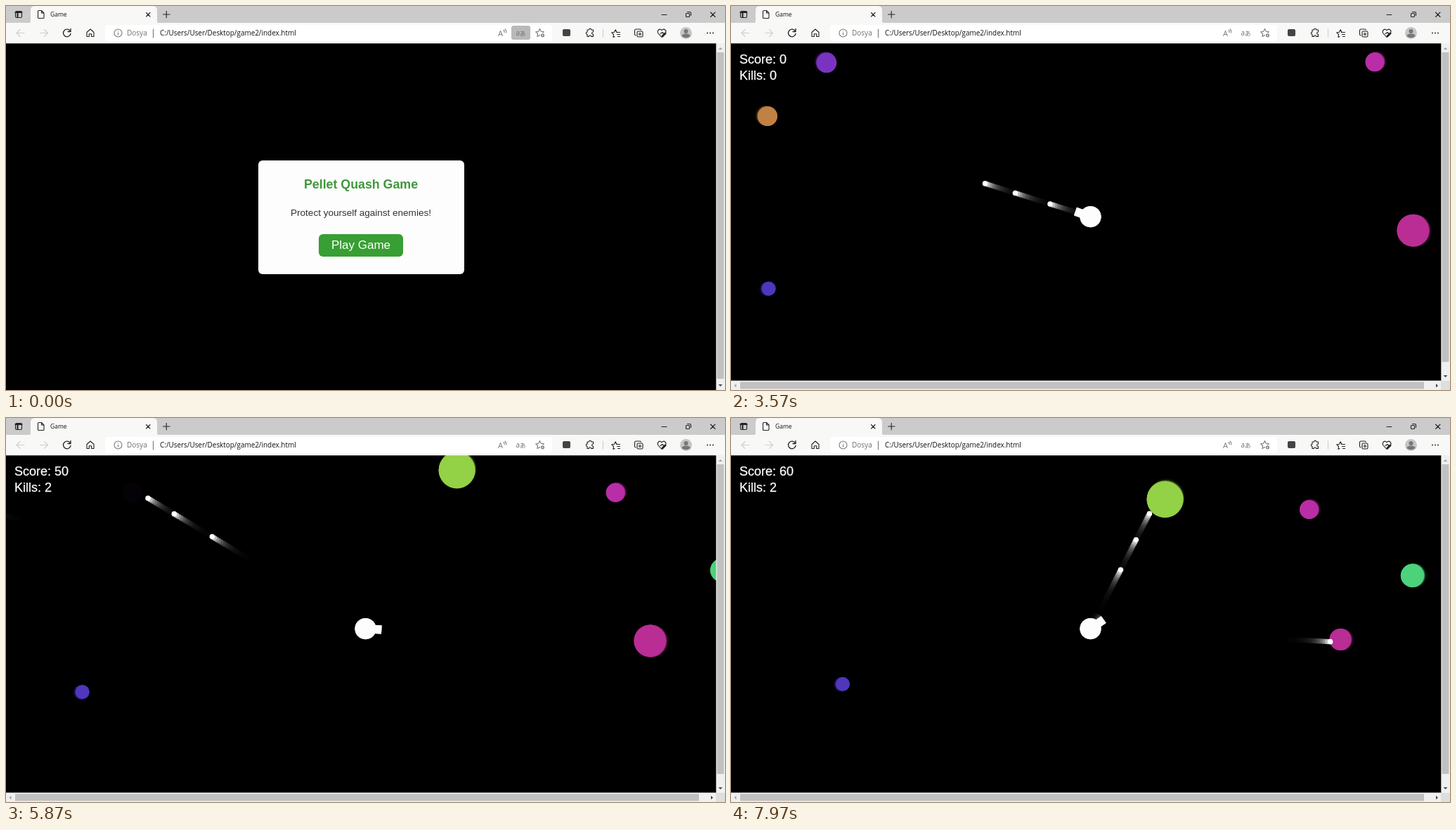
An HTML page with a canvas that plays this animation: 1023x547 px, repeating every 8000 ms.

```html
<!DOCTYPE html>
<html lang="en">
<head>
<meta charset="utf-8">
<title>Game</title>
<style>
  html, body { margin: 0; width: 100%; height: 100%; overflow: hidden; background: #000; }
  canvas, svg { position: absolute; left: 0; top: 0; display: block; }
  canvas { top: 53px; }
  #hud, #card { position: absolute; font-family: "Liberation Sans", Arial, sans-serif; white-space: nowrap; }
  #hud { left: 12px; top: 65px; color: #fff; font-size: 18px; line-height: 22.7px; -webkit-text-stroke: .25px #fff; }
  #card {
    left: 359px; top: 220px; width: 293px; height: 162px;
    background: #fdfdfd; border-radius: 6px; text-align: center;
  }
  #card * { position: absolute; margin: 0; left: 0; width: 292px; }
  #card h1 { top: 24px; font-size: 17.8px; line-height: 21px; color: #3f983c; }
  #card p { top: 67px; font-size: 13.53px; line-height: 16px; color: #333; }
  #card button {
    left: 86px; top: 105px; width: 120px; height: 32px; padding: 0; border: 0;
    border-radius: 6px; background: #379f33; color: #fff; font: 17px/32px "Liberation Sans", Arial, sans-serif;
  }
  svg text { font-family: "Open Sans", "Noto Sans", sans-serif; }
  .ic { fill: none; stroke: #222; stroke-width: 1.1; stroke-linecap: round; stroke-linejoin: round; }
  .dim { stroke: #cfcfcf; }
  .soft { stroke: #777; }
</style>
</head>
<body>
<canvas id="game" width="1011" height="494"></canvas>
<div id="hud"><div>Score: <span id="score">0</span></div><div>Kills: <span id="kills">0</span></div></div>
<div id="card">
  <h1>Pellet Quash Game</h1>
  <p>Protect yourself against enemies!</p>
  <button>Play Game</button>
</div>

<svg width="1023" height="547" viewBox="0 0 1023 547">
  <!-- tab strip -->
  <rect width="1023" height="25" fill="#cbcbcb"/>
  <path d="M31 25q4 0 4-4V6q0-6 6-6h168q6 0 6 6v15q0 4 4 4z" fill="#f8f8f7"/>
  <rect y="24" width="1023" height="29.300" fill="#f8f8f7"/>
  <rect x="141" y="27" width="636" height="23" rx="4" fill="#fff"/>
  <g class="ic">
    <rect x="13.500" y="7.500" width="9" height="9" rx="1.500"/>
    <path d="M13.500 9h9M16.500 9v7" stroke-width="2"/>
    <path d="M45.500 7.500q0-1 1-1h4l3.500 3.500v6.500q0 1-1 1h-6.500q-1 0-1-1zM50.500 6.500v3.500h3.500"/>
    <path d="M199.500 9.500l5.500 5.500m0-5.500l-5.500 5.500M223.500 12h9.500M228.200 7.200v9.500"/>
    <path d="M933 12.500h7M1002.500 9l6.500 6.500m0-6.500l-6.500 6.500"/>
    <rect x="967.500" y="10.500" width="5" height="5" rx="1"/>
    <path d="M969.500 8.500h3.500q1.500 0 1.500 1.500v3.500"/>
  </g>
  <text x="63" y="15.300" font-size="8.500" fill="#111">Game</text>

  <!-- toolbar -->
  <g class="ic dim">
    <path d="M26 38.500h-11m5-5l-5 5 5 5M48.500 38.500h11m-5-5l5 5-5 5"/>
  </g>
  <g class="ic">
    <path d="M91.500 36a5.300 5.300 0 1 0 .5 3.500M92 32.500v4h-4" stroke-width="1.300"/>
    <path d="M115 37.500l5-4.500 5 4.500v6h-3.300v-3.700h-3.400v3.700H115z"/>
  </g>
  <g class="ic soft">
    <circle cx="159.500" cy="38.500" r="5.500"/>
    <path d="M159.500 38v3M159.500 35.700v.1M209.500 33v12"/>
    <path d="M708 34.500q1.500 1.200 1.200 3.200M710 33q2.300 2 1.800 5"/>
  </g>
  <text x="172" y="42" font-size="10" fill="#707070">Dosya</text>
  <text x="219" y="42" font-size="9.920" fill="#111">C:/Users/User/Desktop/game2/index.html</text>
  <text x="700" y="42.500" font-size="11" fill="#777">A</text>
  <rect id="hover" x="719" y="28" width="27" height="20" rx="3" fill="#b9b9b9"/>
  <text x="725.500" y="41.700" font-size="10" fill="#707070">a<tspan style="font-family:'Noto Sans CJK JP','Noto Sans CJK',sans-serif" font-size="8.500">あ</tspan></text>
  <g class="ic" stroke-width="1">
    <path d="M759.500 32.500l1.800 3.700 4 .6-2.900 2.800.5 3.900-3.400-1.900-3.600 1.900.7-4-2.900-2.700 4-.6z" class="soft"/>
    <circle cx="763.500" cy="42" r="3" fill="#555" stroke="#fff"/>
    <path d="M762 42h3M763.500 40.500v3" stroke="#fff" stroke-width=".8"/>
    <rect x="792" y="33" width="11" height="10" rx="2" fill="#444" stroke="none"/>
    <path d="M827 34h2.500q.2-2 1.600-2t1.600 2h2.800v3q-2 .1-2 1.700t2 1.700v3h-3q-.2-1.600-1.500-1.600t-1.500 1.600H827v-3q-1.700-.1-1.700-1.600t1.700-1.700z"/>
    <path d="M849.500 33v11" stroke="#ccc"/>
    <path d="M866 43.500l-2 1 .5-4-2.700-2.700 3.700-.5 1.700-3.600 1.700 3.600M868.500 37.500h5M869.500 40.500h4M870.500 43.500h3"/>
    <rect x="898" y="36" width="8" height="8" rx="1.500"/>
    <path d="M896 42q-1.500-.3-1.500-2v-5q0-2 2-2h5q2 0 2 1M900 40h4M902 38v4"/>
    <path d="M933 44.500l-5-5.500q-1.800-3 .5-5t4.500.700q2.500-2.700 4.800-.7t.3 5zM931 39.500l3-2 2 2"/>
    <path d="M934 43l4-4" stroke-width="3"/>
  </g>
  <circle cx="967.500" cy="38.500" r="8.500" fill="#c6c6c6"/>
  <circle cx="967.500" cy="36" r="3" fill="#777"/>
  <path d="M961.500 43q0-3.500 6-3.500t6 3.500q-6 4.500-12 0z" fill="#777"/>
  <path d="M998 38.500h.01M1002 38.500h.01M1006 38.500h.01" stroke="#222" stroke-width="1.900" stroke-linecap="round"/>

  <!-- scrollbars -->
  <rect x="1010.300" y="53" width="12.700" height="494" fill="#f0f0f0"/>
  <rect id="thumb" x="1011.500" y="66" width="10" height="465" fill="#c1c1c1"/>
  <path d="M1013.700 62h5.600l-2.800-3z" fill="#a3a3a3"/>
  <path id="down" d="M1013.700-1.500h5.600l-2.800 3z" fill="#444"/>
  <g id="hbar">
    <rect y="533.600" width="1010.300" height="13.400" fill="#f0f0f0"/>
    <rect x="1010" y="534" width="13" height="13" fill="#dedede"/>
    <rect x="13" y="535.500" width="973" height="10" fill="#c1c1c1"/>
    <path d="M7.500 538v5.600l-3-2.800z" fill="#a3a3a3"/>
    <path d="M1003 538v5.600l3-2.800z" fill="#444"/>
  </g>
</svg>

<script>
const LOOP = 8000, START = 450, BAR = 870, STEP = 1000 / 60, TRAIL = 16, FADE = 0.26;
const CX = 511.5, CY = 300.2;
const $ = id => document.getElementById(id);
const ctx = $('game').getContext('2d');

// Each enemy drifts in a straight line through two timed points.
const enemies = [
  { color: '#7a33c0', r: 14.3, from: [2370, 111, 66], to: [5130, 168.5, 100], end: 5700 },
  { color: '#c08145', r: 14, from: [2370, 24.5, 148.5], to: [3570, 52, 157], end: 4796 },
  { color: '#4f36bd', r: 10, from: [2370, 25, 409], to: [7970, 159, 379] },
  { color: '#b92da6', r: 13.5, from: [2370, 941.5, 66], to: [7970, 822.5, 130.5] },
  { color: '#b92d95', r: 23, from: [2370, 998.5, 321], to: [7970, 867, 315.5], hit: 7347 },
  { color: '#93d146', r: 26, from: [5130, 650, 59.7], to: [7970, 617.5, 116], born: 3580 },
  { color: '#4bd27a', r: 16.7, from: [6730, 998.5, 220], to: [7970, 969.5, 224.5] }
];

// Distances from the turret at time t; ends cut a shot short on impact.
const volleys = [
  { t: 3570, angle: 197.5, speed: 0.2256, dist: [157, 112, 60], ends: [4796] },
  { t: 5130, angle: 211, speed: 0.222, dist: [239, 196.5, 153, 90], ends: [5700] },
  { t: 6730, angle: 3.1, speed: 0.2237, dist: [206, 157, 64], ends: [7347, 7347] },
  { t: 7970, angle: 297.1, speed: 0.2237, dist: [184, 142, 94], ends: [] }
];

// time, turret angle in degrees
const aim = [
  [0, 201], [2370, 201], [2800, 198], [3500, 198], [4000, 211], [4730, 211],
  [4940, 355], [5130, 355], [5700, 363], [6500, 363], [6730, 308],
  [6900, 297], [7600, 297], [7780, 300], [7920, 325], [8000, 325]
];

const scores = [[7347, 60, 2], [5700, 50, 2], [4796, 25, 1], [0, 0, 0]];

const mix = (a, b, p) => a + (b - a) * p;
const rad = deg => deg * Math.PI / 180;

function aimAt(t) {
  const i = Math.max(1, aim.findIndex(k => k[0] >= t));
  const [t0, a] = aim[i - 1], [t1, b] = aim[i];
  return rad(mix(a, b, (t - t0) / (t1 - t0)));
}

function disc(x, y, r, color) {
  ctx.fillStyle = color;
  ctx.beginPath();
  ctx.arc(x, y, r, 0, Math.PI * 2);
  ctx.fill();
}

function drawEnemies(t) {
  for (const e of enemies) {
    if (t < (e.born || 0) || t >= (e.end || LOOP)) continue;
    const [t0, x0, y0] = e.from, [t1, x1, y1] = e.to;
    const p = (t - t0) / (t1 - t0);
    const shrink = e.hit ? Math.min(1, Math.max(0, (t - e.hit) / 300)) : 0;
    disc(mix(x0, x1, p), mix(y0, y1, p), e.r - 7.5 * shrink * (2 - shrink), e.color);
  }
}

function drawShots(t) {
  for (const v of volleys) {
    const a = rad(v.angle);
    v.dist.forEach((d0, i) => {
      const d = d0 + v.speed * (t - v.t);
      if (d > 0 && t < (v.ends[i] || LOOP)) {
        disc(CX + d * Math.cos(a), CY + d * Math.sin(a), 3.8, '#fff');
      }
    });
  }
}

function drawTurret(t) {
  ctx.save();
  ctx.translate(CX, CY);
  ctx.rotate(aimAt(t));
  ctx.fillStyle = '#fdfdfd';
  ctx.fillRect(0, -6, 22.8, 12);
  ctx.restore();
  disc(CX, CY, 15, '#fdfdfd');
}

// Replays the last few ticks, dimming before each, to leave fading trails.
function drawGame(t) {
  ctx.setTransform(1, 0, 0, 1, 0, 0);
  ctx.fillStyle = '#000';
  ctx.fillRect(0, 0, 1011, 494);
  ctx.translate(0, -53);
  for (let k = TRAIL; k >= 0; k--) {
    const past = t - k * STEP;
    if (past < START) continue;
    ctx.fillStyle = `rgba(0,0,0,${FADE})`;
    ctx.fillRect(0, 53, 1011, 494);
    drawEnemies(past);
    drawShots(past);
    drawTurret(past);
  }
}

const show = (id, on) => { $(id).style.display = on ? '' : 'none'; };

function frame() {
  const t = performance.now() % LOOP;
  const playing = t >= START, bar = t >= BAR;
  show('card', !playing);
  show('hover', !playing);
  show('hud', playing);
  show('hbar', bar);
  $('thumb').setAttribute('height', bar ? 441 : 465);
  $('down').setAttribute('transform', `translate(0 ${bar ? 527.5 : 540.5})`);
  const [, score, kills] = scores.find(s => t >= s[0]);
  $('score').textContent = score;
  $('kills').textContent = kills;
  drawGame(t);
  requestAnimationFrame(frame);
}
frame();
</script>
</body>
</html>
```
